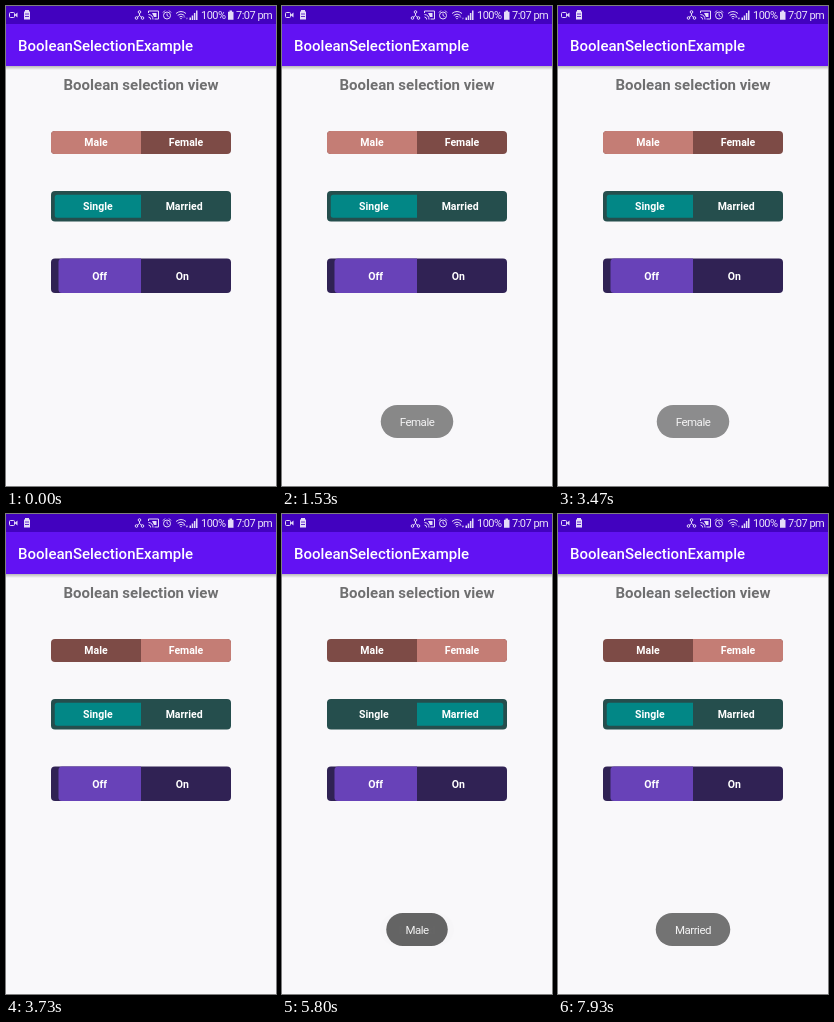
These frames come from a looping animation (270x480 px, 8000 ms). An HTML page:

```html
<!DOCTYPE html>
<html lang="en">
<head>
<meta charset="utf-8">
<title>Boolean selection</title>
<style>
  html, body { margin: 0; width: 100%; height: 100%; overflow: hidden; background: #f9f8fa; }
  svg { display: block; width: 270px; height: 480px; font-family: Roboto, sans-serif; }
  .status { font-size: 11px; letter-spacing: -.5px; fill: #ece5fa; }
  .label { font-size: 10.5px; font-weight: 700; fill: #fff; text-anchor: middle; }
  .toast { font-size: 11.5px; letter-spacing: -.5px; fill: #f3f3f3; text-anchor: middle; }
  .line { fill: none; stroke: #e4dbf8; stroke-width: 1; }
  .solid { fill: #e4dbf8; }
</style>
</head>
<body>
<svg viewBox="0 0 270 480">
  <defs>
    <linearGradient id="shade" x2="0" y2="1">
      <stop stop-color="#000" stop-opacity=".26"/>
      <stop offset="1" stop-color="#000" stop-opacity="0"/>
    </linearGradient>
  </defs>
  <rect width="270" height="480" fill="#f9f8fa"/>
  <rect y="60" width="270" height="4" fill="url(#shade)"/>
  <rect width="270" height="60" fill="#6212f3"/>
  <rect width="270" height="18" fill="#4202bf"/>

  <!-- status bar -->
  <rect class="line" x="3.5" y="6.5" width="5" height="5" rx="1"/>
  <path class="solid" d="M8.5 9 11.5 6.5V11.5Z"/>
  <path class="solid" d="M19 4h4v1.5h1v8h-6v-8h1z"/>
  <path d="M19 8h4M19 10.5h4" stroke="#4202bf" stroke-width=".8"/>
  <path class="line" d="M133.5 7v2.5l-2.5 2M133.5 9.500l2.500 2"/>
  <g class="line">
    <circle cx="133.500" cy="6" r="1.300"/>
    <circle cx="130.500" cy="12" r="1.300"/>
    <circle cx="136.500" cy="12" r="1.300"/>
  </g>
  <path class="line" d="M142.500 7V5h10v8h-4M142.500 8.500a5 5 0 0 1 4.500 5M142.500 11a2.500 2.500 0 0 1 2.200 2.500"/>
  <path class="solid" d="M146 7h4.500v4H148z"/>
  <circle class="line" cx="161" cy="9.500" r="3.500"/>
  <path class="line" d="M161 7.500v2l1.500 1M157 6.500l2-2M165 6.500l-2-2"/>
  <path class="line" d="M170 7.500q5-4 10 0M171.700 9.300q3.300-2.600 6.600 0M173.400 11q1.600-1.300 3.200 0"/>
  <path class="solid" d="M174 12h2l-1 1.500z"/>
  <path class="solid" id="data" d="M177 11.500l1.300-2 1.300 2zM179.700 11.700h2.400l-1.200 2z"/>
  <path class="solid" d="M183.500 11.500h1.500V14h-1.500zM185.700 9.500h1.500V14h-1.500zM187.900 7h1.500v7h-1.500zM190 4.500h1.500V14H190z"/>
  <text class="status" x="195" y="13.200">100%</text>
  <path class="solid" d="M223.500 4.500h2.500v1.200h1.500v8h-5.500v-8h1.500z"/>
  <text class="status" x="230" y="13.200">7:07 pm</text>

  <text x="12" y="45" font-size="15" font-weight="500" fill="#fff">BooleanSelectionExample</text>
  <text x="135" y="83.500" font-size="15" font-weight="700" fill="#6f6f70" text-anchor="middle">Boolean selection view</text>
  <g id="switches"></g>
  <g id="toasts"></g>
</svg>
<script>
const LOOP = 8000;
const $ = id => document.getElementById(id);

// inset is [x, y] of the selected half inside its track
const switches = [
  { names: ['Male', 'Female'], top: 125, height: 23, inset: [0, 0], radius: 4, track: '#7d4b46', thumb: '#c47d75' },
  { names: ['Single', 'Married'], top: 185, height: 30.5, inset: [3.75, 3.75], radius: 2.5, track: '#254e4d', thumb: '#028786' },
  { names: ['Off', 'On'], top: 252.5, height: 34.5, inset: [7.5, 0], radius: 3.5, track: '#302254', thumb: '#6842b8' }
];

// in and out hold the start and end of each fade
const toasts = [
  { name: 'Female', width: 72.5, in: [1170, 1650], out: [3230, 3690] },
  { name: 'Male', width: 61.5, in: [3830, 4265], out: [5760, 6210] },
  { name: 'Married', width: 74.5, in: [5800, 6270], out: [7780, 8240] }
];

function drawSwitch({ names, top, height, inset, radius: r, track, thumb }) {
  const [dx, dy] = inset;
  const x = 45 + dx, y = top + dy, bottom = top + height - dy;
  const shift = dx / 2, base = top + height / 2 + 3.8;
  return `<rect x="45" y="${top}" width="180" height="${height}" rx="4" fill="${track}"/>
    <path class="thumb" fill="${thumb}" d="M135 ${y}H${x + r}q${-r} 0 ${-r} ${r}V${bottom - r}q0 ${r} ${r} ${r}H135z"/>
    <text class="label" x="${90 + shift}" y="${base}">${names[0]}</text>
    <text class="label" x="${180 - shift}" y="${base}">${names[1]}</text>`;
}

function drawToast({ name, width }) {
  return `<g opacity="0"><rect x="${135 - width / 2}" y="399" width="${width}" height="33" rx="16.5" fill="#646464"/>
    <text class="toast" x="135" y="419.700">${name}</text></g>`;
}

$('switches').innerHTML = switches.map(drawSwitch).join('');
$('toasts').innerHTML = toasts.map(drawToast).join('');
const thumbs = document.querySelectorAll('.thumb');
const bubbles = $('toasts').children;

const progress = (t, [from, to]) => Math.min(1, Math.max(0, (t - from) / (to - from)));

function select(i, right) {
  thumbs[i].setAttribute('transform', right ? 'translate(270) scale(-1 1)' : '');
}

function frame() {
  const t = performance.now() % LOOP;
  select(0, t >= 3600);
  select(1, t >= 5470 && t < 7330);
  toasts.forEach((toast, i) => {
    const alpha = progress(t, toast.in) * (1 - progress(t, toast.out) ** 2);
    bubbles[i].setAttribute('opacity', alpha);
  });
  $('data').setAttribute('opacity', t >= 2600 && t < 6600 ? .9 : .5);
  requestAnimationFrame(frame);
}
frame();
</script>
</body>
</html>
```
